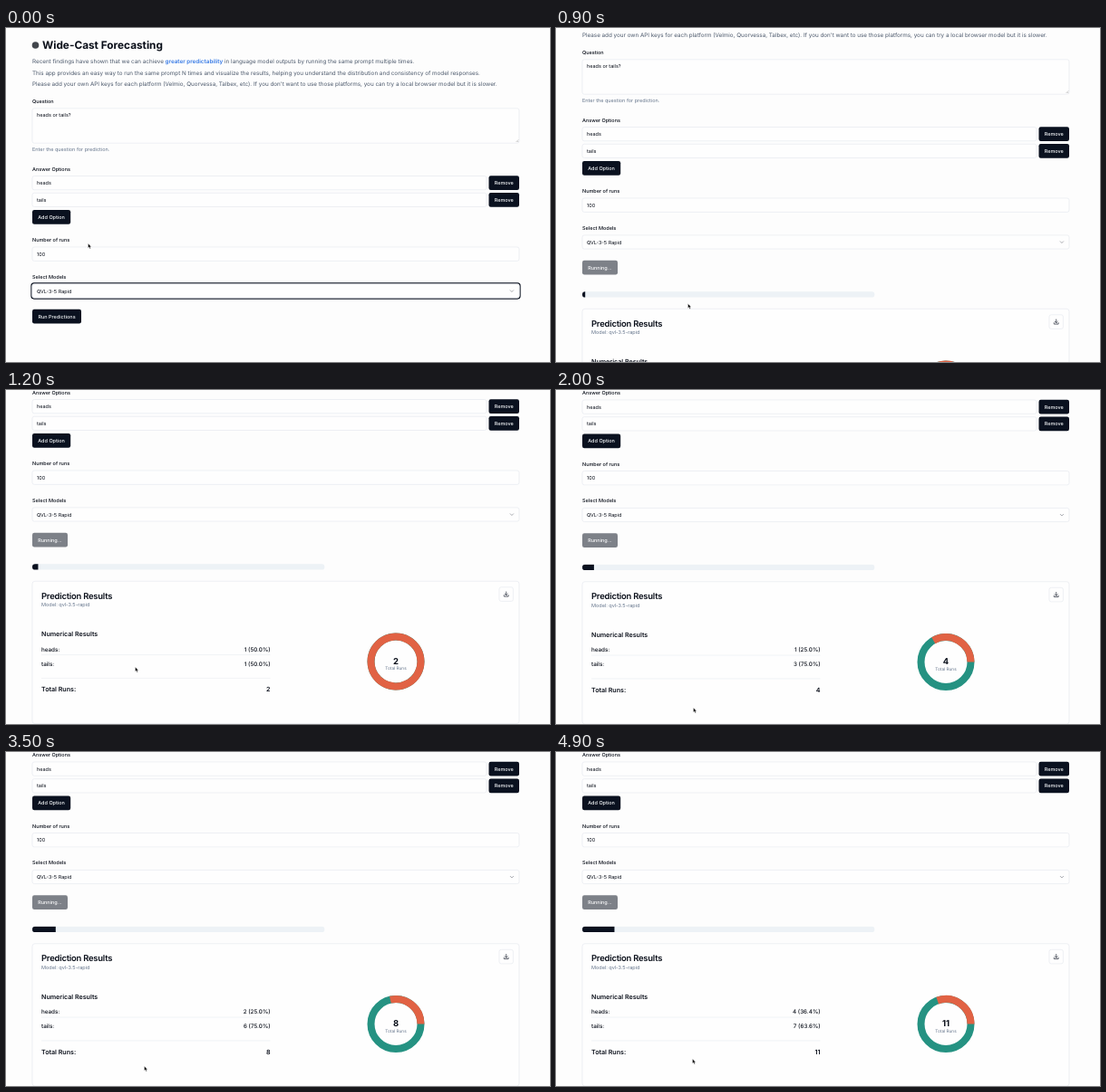
Recreate the animation shown at these times as an HTML page. Size 600 by 369 pixels, loop 5 s.

```html
<!DOCTYPE html>
<html lang="en">
<head>
<meta charset="utf-8">
<title>Prediction runs</title>
<style>
  html, body { margin: 0; width: 100%; height: 100%; overflow: hidden; background: #fdfdfd; }
  svg { display: block; width: 100vw; height: 100vh; }
  text { font-family: Inter, "Liberation Sans", sans-serif; font-size: 5.5px; fill: #080d18; text-rendering: geometricPrecision; }
  .body { font-size: 6.3px; fill: #4b586b; }
  .link { font-weight: 600; fill: #3478e5; }
  .medium { font-weight: 500; }
  .muted { fill: #64748b; }
  .row { font-size: 6.3px; font-weight: 500; }
  .strong { font-size: 7.1px; font-weight: 600; }
  .end { text-anchor: end; }
  .mid { text-anchor: middle; }
  .btn text { fill: #f8fafc; font-weight: 500; text-anchor: middle; }
  .btn rect { fill: #0a111f; }
  .field { fill: #fefefe; stroke: #e2e6ec; stroke-width: .6; }
  .rule { stroke: #e2e6ec; stroke-width: .5; }
  .icon { fill: none; stroke: #111827; stroke-width: .65; stroke-linecap: round; stroke-linejoin: round; }
</style>
</head>
<body>
<svg viewBox="0 0 600 369" preserveAspectRatio="none">
  <defs>
    <clipPath id="pill"><rect x="29" y="345.2" width="322.4" height="6.4" rx="3.2"/></clipPath>
  </defs>
  <g id="page">
    <circle cx="32.5" cy="19" r="3.8" fill="#42464c"/>
    <text x="40" y="23.2" style="font-size:11.8px;font-weight:700">Wide-Cast Forecasting</text>
    <text class="body" x="29" y="39.2">Recent findings have shown that we can achieve <tspan class="link">greater predictability</tspan> in language model outputs by running the same prompt multiple times.</text>
    <text class="body" x="29" y="51.7">This app provides an easy way to run the same prompt N times and visualize the results, helping you understand the distribution and consistency of model responses.</text>
    <text class="body" x="29" y="64.2">Please add your own API keys for each platform (Velmio, Quorvessa, Talbex, etc). If you don't want to use those platforms, you can try a local browser model but it is slower.</text>

    <text class="medium" x="29" y="83">Question</text>
    <rect class="field" x="29" y="88.8" width="537" height="38.4" rx="2.2"/>
    <path d="M562.6 126l2.6-2.6M564.2 126l1-1" stroke="#777" stroke-width=".4"/>
    <text x="34" y="98.3">heads or tails?</text>
    <text class="muted" x="29" y="136.2">Enter the question for prediction.</text>

    <text class="medium" x="29" y="157.6">Answer Options</text>
    <g id="options"></g>

    <text class="medium" x="29" y="236.2">Number of runs</text>
    <rect class="field" x="29" y="242" width="537" height="15.4" rx="2.2"/>
    <text x="34" y="251.8">100</text>

    <text class="medium" x="29" y="276.9">Select Models</text>
    <rect id="ring" x="27.9" y="281.9" width="539.2" height="17.2" rx="3" fill="#fff" stroke="#0a111f" stroke-width="1.1"/>
    <rect class="field" x="29" y="282.9" width="537" height="15.2" rx="2.2"/>
    <text x="34" y="292.6">QVL-3-5 Rapid</text>
    <path class="icon" d="M556.2 289.8l1.7 1.7 1.7-1.7" stroke-opacity=".55"/>

    <g class="btn" id="run">
      <rect x="29" y="310.8" width="54" height="15.7" rx="2.2"/>
      <text x="56" y="320.7">Run Predictions</text>
    </g>
    <g class="btn" id="running" opacity=".52">
      <rect x="29" y="310.8" width="39" height="15.7" rx="2.2"/>
      <text x="48.5" y="320.7">Running...</text>
    </g>

    <g id="progress" clip-path="url(#pill)">
      <rect x="29" y="345" width="323" height="7" fill="#edf2f6"/>
      <rect id="bar" x="29" y="345" width="0" height="7" fill="#0a111f"/>
    </g>

    <g id="card">
      <rect x="29" y="364.2" width="537" height="157.4" rx="3" class="field"/>
      <text x="39" y="383.9" style="font-size:9.45px;font-weight:600;letter-spacing:-.025em">Prediction Results</text>
      <text class="muted" x="39" y="392.4">Model: qvl-3.5-rapid</text>
      <rect class="field" x="544" y="370.8" width="15.4" height="15.6" rx="2.2"/>
      <path class="icon" d="M551.7 376v3.6M550.2 378.2l1.5 1.5 1.5-1.5M549.3 379.7v1.4h4.8v-1.4"/>

      <text class="strong" x="39" y="425.4">Numerical Results</text>
      <text class="row" x="39" y="441.7">heads:</text>
      <text class="row end" x="291.5" y="441.7" id="heads"></text>
      <path class="rule" d="M39 445.6H291.5"/>
      <text class="row" x="39" y="457.7">tails:</text>
      <text class="row end" x="291.5" y="457.7" id="tails"></text>
      <path class="rule" d="M39 471.4H291.5"/>
      <text class="strong" x="39" y="486">Total Runs:</text>
      <text class="strong end" x="291.5" y="486" id="total"></text>

      <g fill="none" stroke-width="8">
        <circle cx="430" cy="453" r="27.5" stroke="#259282"/>
        <path id="slice" stroke="#e16244"/>
      </g>
      <text class="mid" x="430" y="455.6" id="hub" style="font-size:9.45px;font-weight:700"></text>
      <text class="mid muted" x="430" y="462.2" style="font-size:4.73px">Total Runs</text>
    </g>
  </g>
  <path id="cursor" d="M0 0V5.1L1.2 4.1 2 6 2.9 5.6 2.1 3.8H3.6Z" fill="#000" stroke="#fff" stroke-width=".4"/>
</svg>
<script>
const $ = id => document.getElementById(id);
const LOOP = 5000, STEP = 100;

const button = (x, y, w, label) =>
  `<g class="btn"><rect x="${x}" y="${y}" width="${w}" height="15.7" rx="2.2"/>` +
  `<text x="${x + w / 2}" y="${y + 9.9}">${label}</text></g>`;

$('options').innerHTML = ['heads', 'tails'].map((name, i) => {
  const y = 163.3 + i * 18.7;
  return `<rect class="field" x="29" y="${y + .2}" width="501" height="15.3" rx="2.2"/>` +
    `<text x="34" y="${y + 9.8}">${name}</text>` + button(532.5, y, 33.5, 'Remove');
}).join('') + button(29, 201, 42.2, 'Add Option');

// Each run: time of its result and the heads counted so far.
const runs = [
  [700, 1], [1200, 1], [1500, 1], [1900, 1], [2300, 2], [2500, 2],
  [3100, 2], [3500, 2], [3800, 3], [4300, 3], [4600, 4]
];
const scrollKeys = [[700, 0], [800, 18], [900, 54], [1000, 100], [1100, 139], [1200, 153], [1300, 152.5]];
const cursorKeys = [
  [0, 90.5, 238], [100, 98, 202], [200, 96, 172], [300, 72, 255], [400, 58, 316], [600, 70, 318],
  [900, 145.5, 304.5], [1200, 142.5, 306], [1700, 151, 355], [1900, 151.5, 353],
  [2000, 151.5, 351], [2500, 152, 347], [3500, 152.5, 347], [4300, 152.5, 347], [4900, 150.5, 339]
];

function track(keys, t) {
  const i = keys.findIndex(k => k[0] > t);
  if (i === 0) return keys[0].slice(1);
  if (i < 0) return keys[keys.length - 1].slice(1);
  const a = keys[i - 1], b = keys[i], u = (t - a[0]) / (b[0] - a[0]);
  return a.slice(1).map((v, k) => v + (b[k + 1] - v) * u);
}

const ease = u => u * u * (3 - 2 * u);
const show = (id, on) => $(id).style.display = on ? '' : 'none';
const share = n => n ? runs[n - 1][1] / n : 1;

// The chart holds the previous share briefly, then eases to the new one.
function chartShare(n, t) {
  const u = Math.min(1, Math.max(0, (t - runs[n - 1][0] - 250) / 300));
  return share(n - 1) + (share(n) - share(n - 1)) * ease(u);
}

function arc(part) {
  const r = 27.5, a = Math.min(part, .9999) * 2 * Math.PI;
  return `M${430 + r} 453A${r} ${r} 0 ${part > .5 ? 1 : 0} 0 ${430 + r * Math.cos(a)} ${453 - r * Math.sin(a)}`;
}

function draw(t) {
  const n = runs.filter(r => r[0] <= t).length;
  const [x, y] = track(cursorKeys, t);
  $('page').setAttribute('transform', `translate(0 ${-track(scrollKeys, t)[0]})`);
  $('cursor').setAttribute('transform', `translate(${x} ${y})`);
  show('ring', t < 400);
  show('run', t < 500);
  show('running', t >= 500);
  show('progress', t >= 500);
  show('card', n > 0);
  $('bar').setAttribute('width', n * 3.224);
  if (!n) return;
  const heads = runs[n - 1][1];
  const label = c => `${c} (${(100 * c / n).toFixed(1)}%)`;
  $('heads').textContent = label(heads);
  $('tails').textContent = label(n - heads);
  $('total').textContent = $('hub').textContent = n;
  $('slice').setAttribute('d', arc(chartShare(n, t)));
}

const start = performance.now();
function tick() {
  const t = (performance.now() - start) % LOOP;
  draw(Math.floor(t / STEP) * STEP);
  requestAnimationFrame(tick);
}
tick();
</script>
</body>
</html>
```
